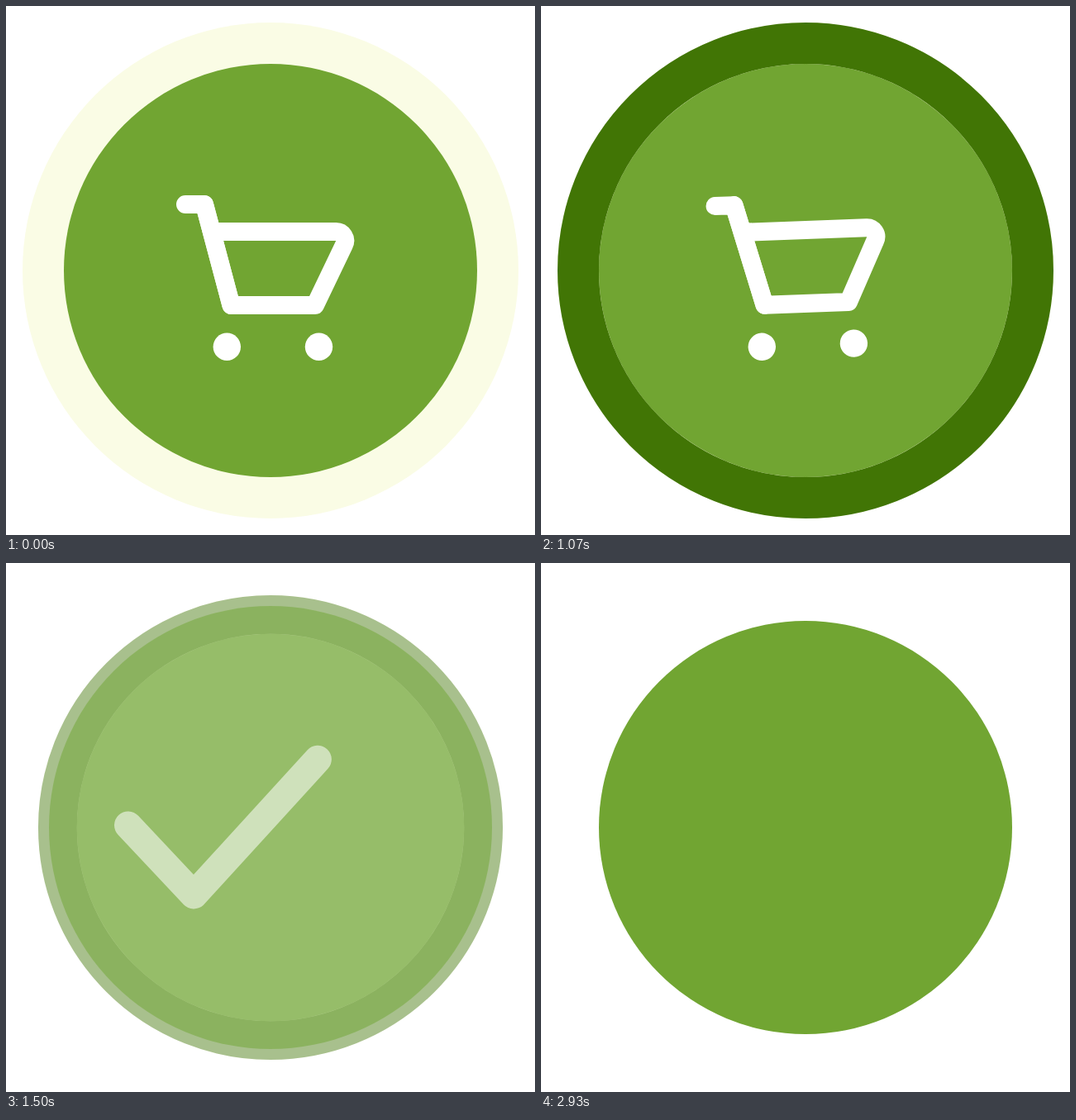
Animation, 640 px wide and 640 px high, one loop 3000 ms. Source, as an HTML page:

```html
<!DOCTYPE html>
<html lang="en">
<head>
<meta charset="utf-8">
<title>Cart to check</title>
<style>
html, body { margin: 0; width: 100%; height: 100%; overflow: hidden; background: #fff; }
svg { display: block; width: 100%; height: 100%; }
path { fill: none; stroke-linecap: round; stroke-linejoin: round; }
</style>
</head>
<body>
<svg viewBox="0 0 640 640">
  <clipPath id="hole"><circle cx="320" cy="320" r="250"/></clipPath>
  <g id="badge">
    <circle cx="320" cy="320" r="300" fill="#fafce5"/>
    <circle cx="320" cy="320" r="250" fill="#71a532"/>
    <circle id="ring" cx="320" cy="320" r="275" fill="none" stroke="#417505" stroke-width="50"
      pathLength="100" transform="rotate(-90 320 320)"/>
  </g>
  <circle id="disc" cx="320" cy="320" fill="#71a532"/>
  <g clip-path="url(#hole)">
    <g id="cart" fill="#fff" stroke="#fff" stroke-width="0">
      <g id="body">
        <path stroke-width="22" d="M217 240H240L272.4 362H374L409 289A11 11 0 0 0 399 273H249"/>
        <path stroke-width="22" d="M240 240L272.4 362"/>
        <circle cx="267.3" cy="412.3" r="16.7"/>
        <circle cx="378.5" cy="412.3" r="16.7"/>
      </g>
      <rect id="streak" x="182" y="351" width="44.5" height="12.5" rx="6"/>
    </g>
    <path id="check" stroke="#fff" stroke-width="30" d="M217 317.5L288 393L422 246.3"/>
  </g>
</svg>
<script>
const LOOP = 3000, FPS = 14;
const el = id => document.getElementById(id);
const clamp = x => Math.min(1, Math.max(0, x));
const smooth = x => (x = clamp(x)) * x * (3 - 2 * x);
const set = (id, attrs) => {
  for (const name in attrs) el(id).setAttribute(name, attrs[name]);
};
const zoom = s => `translate(320 320) scale(${s}) translate(-320 -320)`;

// k counts animation steps, 14 per second
function draw(k) {
  const sweep = clamp((k - 0.97) / 14);
  const fade = clamp((22 - k) * 0.45);
  set('badge', { opacity: fade, transform: zoom(1 - 0.115 * (1 - fade)) });
  set('ring', {
    'stroke-dasharray': sweep < 1 ? `${sweep * 100} 200` : 'none',
    visibility: sweep > 0 ? 'visible' : 'hidden'
  });

  // wheelie on the back wheel, then drive off
  const drive = 341 * Math.max(0, (k - 15) / 5) ** 1.8;
  const tilt = -8.3 * smooth((k - 14) / 3);
  set('cart', {
    transform: `translate(${drive} 0)`,
    'fill-opacity': fade, 'stroke-opacity': fade
  });
  set('body', { transform: `rotate(${tilt} 267.3 412.3)` });
  set('streak', { visibility: k >= 18 ? 'visible' : 'hidden' });

  // disc and check settle from oversize
  const left = clamp((27 - k) / 5 / 1.4) * 1.4;
  const slide = -228 * clamp((22 - k) / 2) ** 2;
  set('disc', { r: 250 + 12.5 * left ** 2, opacity: clamp((k - 20) / 2) });
  set('check', {
    opacity: k < 41 ? 1 - fade : 0,
    transform: `translate(${slide} 0) ${zoom(1 + 0.065 * left ** 3.3)}`
  });
}

const start = performance.now();
function tick() {
  const t = (performance.now() - start) % LOOP;
  draw(Math.floor((t + 5) * FPS / 1000) % (LOOP * FPS / 1000));
  requestAnimationFrame(tick);
}
tick();
</script>
</body>
</html>
```
